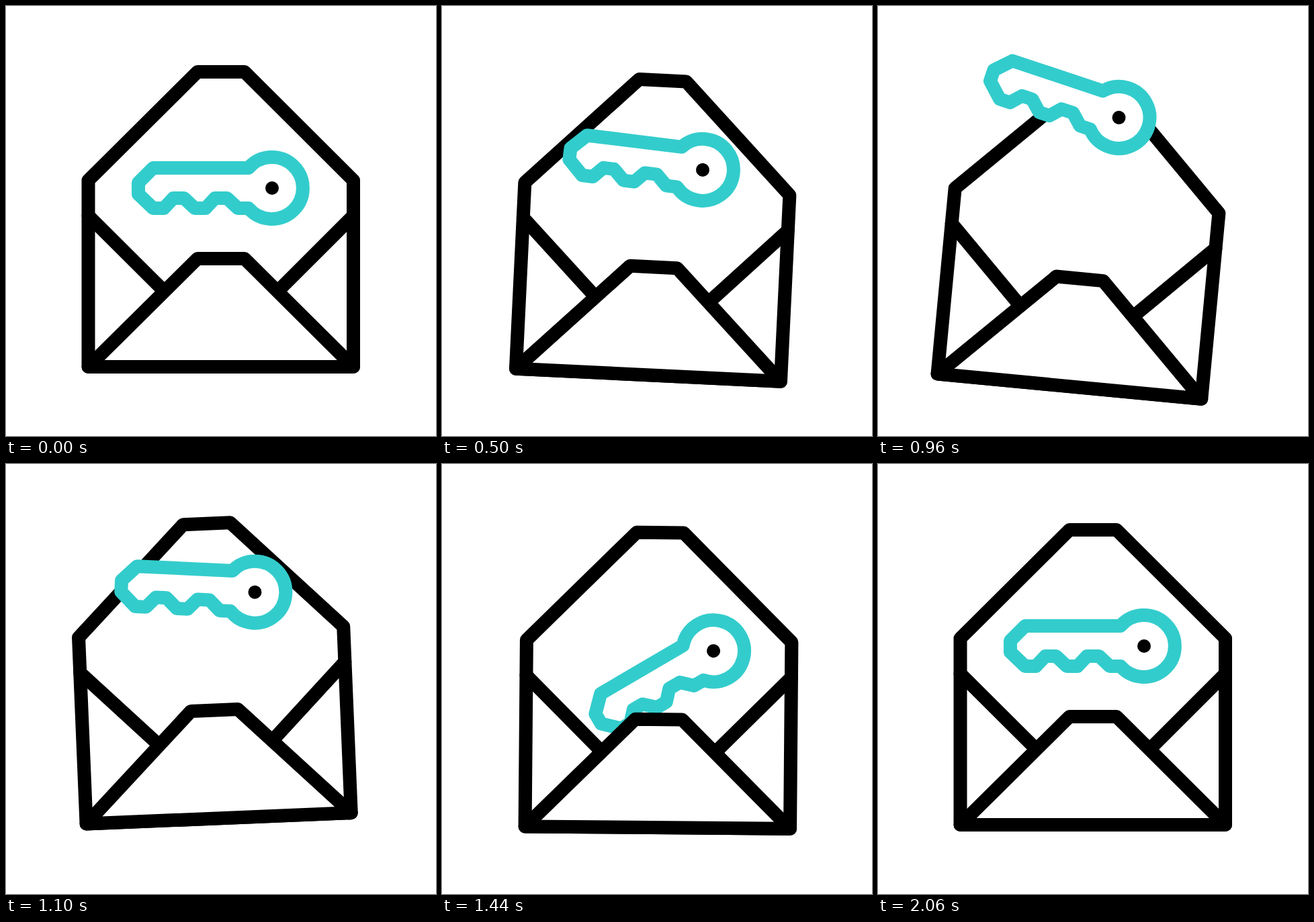
These frames come from a looping animation (640 px wide and 640 px high, 2200 ms). An HTML page:

```html
<!DOCTYPE html>
<html lang="en">
<head>
<meta charset="utf-8">
<title>Envelope and key</title>
<style>
  html, body { margin: 0; width: 100%; height: 100%; overflow: hidden; background: #fff; }
  svg { display: block; width: 100%; height: 100%; }
</style>
</head>
<body>
<svg viewBox="0 0 640 640" fill="#fff" stroke="#000" stroke-width="20" stroke-linejoin="round" stroke-linecap="round">
  <g id="envelope">
    <path d="M285 98H355L517 259.5V537H122.5V259.5Z"/>
    <path d="M122.5 312L235 424M517 312L405 424"/>
    <g id="key">
      <path stroke="#3cc" d="M361 241H219L197 263V280L219 301H235L249 286H265L281 301H297L311 286H329L345 301H361A46 46 0 1 0 361 241Z"/>
      <circle cx="396" cy="271" r="10" fill="#000" stroke="none"/>
    </g>
    <path d="M122.5 537L285 376H355L517 537Z"/>
  </g>
</svg>
<script>
const LOOP = 2200;

// Rows: time, angle, x shift, y shift
const envelopeKeys = [
  [20, 0, 0, 0],
  [500, 2.76, -2.3, 12.5],
  [780, 5.5, -9.2, 29],
  [905, 6.7, -15, 36.6],
  [1100, -2.33, -12.1, -9.25],
  [1215, -7.2, -21, -36],
  [1440, 0.45, 2.85, 4],
  [1510, 2.4, 4.7, 12.9],
  [1715, 0, 0, 0]
];
// The key moves relative to the envelope
const keyKeys = [
  [20, 0, 0, 0],
  [500, 4.24, -10, -42.8],
  [780, 9.7, -29, -100.7],
  [950, 13.1, -41, -140],
  [1100, 5.2, -8.6, -68.6],
  [1250, -3, 0, 0],
  [1440, -30.75, 4.8, 2.4],
  [1465, -32.5, 5, 2.5],
  [1740, 12.3, 7, -1],
  [2060, 0, 0, 0]
];

const slope = (a, b, c) => (b[c] - a[c]) / (b[0] - a[0]);

// Flat at turning points and ends, harmonic mean elsewhere
function tangent(rows, i, c) {
  if (i === 0 || i === rows.length - 1) return 0;
  const before = slope(rows[i - 1], rows[i], c);
  const after = slope(rows[i], rows[i + 1], c);
  return before * after <= 0 ? 0 : 2 * before * after / (before + after);
}

function sample(rows, t, c) {
  const last = rows.length - 1;
  if (t <= rows[0][0]) return rows[0][c];
  if (t >= rows[last][0]) return rows[last][c];
  const i = rows.findIndex(row => row[0] > t) - 1;
  const a = rows[i], b = rows[i + 1];
  const span = b[0] - a[0], u = (t - a[0]) / span, v = 1 - u;
  return v * v * (1 + 2 * u) * a[c] + u * u * (3 - 2 * u) * b[c]
    + span * u * v * (v * tangent(rows, i, c) - u * tangent(rows, i + 1, c));
}

function pose(id, rows, t, cx, cy) {
  const [angle, x, y] = [1, 2, 3].map(c => sample(rows, t, c));
  document.getElementById(id).setAttribute("transform",
    `translate(${x} ${y}) rotate(${angle} ${cx} ${cy})`);
}

function draw(now) {
  const t = now % LOOP;
  pose("envelope", envelopeKeys, t, 320, 320);
  pose("key", keyKeys, t, 396, 271);
  requestAnimationFrame(draw);
}
requestAnimationFrame(draw);
</script>
</body>
</html>
```
